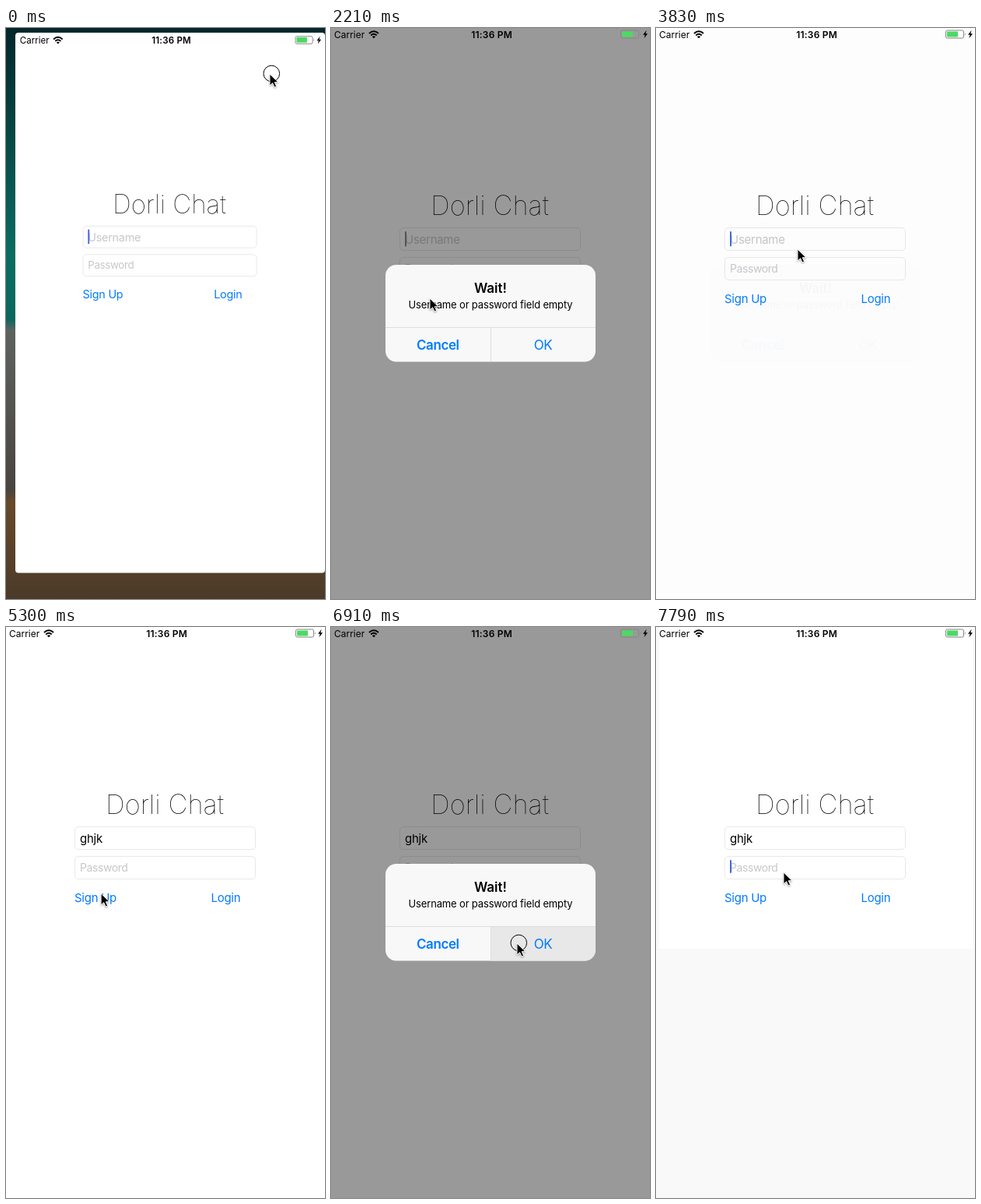
Animation of 410 by 733 pixels, one loop 8 s. Source, as an HTML page:

```html
<!DOCTYPE html>
<html lang="en">
<head>
<meta charset="utf-8">
<title>Chat login</title>
<style>
  html, body { margin: 0; width: 100%; height: 100%; overflow: hidden; background: #fff; }
  svg { display: block; width: 100%; height: 100%; }
  text { font-family: Inter, "Open Sans", sans-serif; white-space: pre; }
  .title { font-size: 34.5px; font-weight: 100; }
  .field { fill: #fff; stroke: #e9e9e9; }
  .hint { fill: #c7c7cc; }
  .body { font-size: 15px; letter-spacing: -.018em; }
  .small { font-size: 14px; letter-spacing: -.03em; }
  .blue { fill: #007aff; }
  .mid { text-anchor: middle; }
  .status { font-size: 12px; }
  .head { font-size: 17px; font-weight: 600; }
  .button { font-size: 17px; letter-spacing: -.025em; }
  .note { font-size: 13px; letter-spacing: -.012em; }
  .bold { font-weight: 600; }
  .arrow { filter: drop-shadow(0 1px 1px rgba(0, 0, 0, .35)); }
</style>
</head>
<body>
<svg viewBox="0 0 410 733" preserveAspectRatio="none">
  <defs>
    <linearGradient id="beach" x1="0" y1="0" x2="0" y2="1">
      <stop offset="0" stop-color="#03262b"/>
      <stop offset=".4" stop-color="#0a6d61"/>
      <stop offset=".51" stop-color="#0b675c"/>
      <stop offset=".53" stop-color="#5d625f"/>
      <stop offset=".81" stop-color="#4a4440"/>
      <stop offset=".83" stop-color="#674a2a"/>
      <stop offset="1" stop-color="#4b3a29"/>
    </linearGradient>
  </defs>
  <rect width="410" height="733" fill="url(#beach)"/>
  <rect id="screen" fill="#fff"/>

  <g id="page">
    <text class="title mid" x="204" y="240">Dorli Chat</text>
    <rect class="field" x="88.5" y="256.5" width="232" height="29" rx="4.5"/>
    <rect class="field" x="88.5" y="294.5" width="232" height="29" rx="4.5"/>
    <text id="user" class="body" x="95" y="276.5"></text>
    <text class="small hint" x="95" y="313.5">Password</text>
    <rect id="caret" width="2" rx="1"/>
    <text id="signup" class="body blue" x="88" y="352.5">Sign Up</text>
    <text class="body blue" x="263.5" y="352.5">Login</text>
  </g>

  <rect id="dim" width="410" height="733"/>
  <path id="edge" d="M0 0H410V733H0ZM4 0V413H407V0Z" fill="#f9f9f9" fill-rule="evenodd"/>

  <g id="status">
    <text class="status" x="4" y="12.7">Carrier</text>
    <g fill="none" stroke="#000" stroke-width="2">
      <path d="M49 7Q55 1.4 61 7"/>
      <path d="M51.3 9.4Q55 6 58.7 9.4"/>
    </g>
    <path d="M55 13.3L52.9 11.2Q55 9.4 57.1 11.2Z"/>
    <text class="status bold mid" x="206.6" y="12.8" letter-spacing=".2">11:36 PM</text>
    <rect x="372.5" y="3" width="23" height="10" rx="2" fill="none" stroke="#858585"/>
    <rect x="374" y="4.5" width="14" height="7" rx=".7" fill="#4cd964"/>
    <path d="M397 6.3Q398.6 8 397 9.7Z" fill="#777"/>
    <path d="M405.6 2.8L401 8.8H403.6L402.4 13.2L407 7.2H404.3Z"/>
  </g>

  <g id="alert">
    <g id="plate">
      <rect x="70" y="304" width="270" height="124.5" rx="14" fill="#f8f8f8"/>
      <path id="pressed" d="M205.5 384.5H340V414.5A14 14 0 0 1 326 428.5H205.5Z" fill="#e8e8e8"/>
      <path d="M70 384.5H340M205.5 384.5V428.5" stroke="#dedee0" fill="none"/>
    </g>
    <g id="words">
      <text class="head mid" x="205" y="340">Wait!</text>
      <text class="note mid" x="205" y="360">Username or password field empty</text>
      <text class="button bold blue mid" x="137.3" y="413">Cancel</text>
      <text class="button blue mid" x="272.5" y="413">OK</text>
    </g>
  </g>

  <g id="mouse">
    <circle id="ring" cx="2.3" cy="-.5" r="10.3" fill="none" stroke="#000"/>
    <path class="arrow" d="M0 0V15L3.6 11.7L6 17L8.6 15.9L6.3 10.7H11Z" stroke="#fff" stroke-linejoin="round"/>
  </g>
</svg>

<script>
const LOOP = 8000, STEP = 147, LAST = 53;
const LOGIN = "ghjk", TYPE_AT = 29, PASSWORD_AT = 52;

// Steps at which each alert is asked for, shown, accepted and dismissed
const rounds = [
  { tap: 11, show: 14, ok: 22, done: 24 },
  { tap: 39, show: 41, ok: 46, done: 47 }
];

const ok = [239, 406];
const home = [339, 59];
const moves = [
  { from: 1, to: 10, place: [127, 347] },
  { from: 17, to: 22, place: ok },
  { from: 24, to: 26, place: [182, 284] },
  { from: 33, to: 38, place: [118, 346] },
  { from: 41, to: 45, place: ok },
  { from: 48, to: PASSWORD_AT, place: [164, 315] }
];

const el = {};
for (const node of document.querySelectorAll("[id]")) el[node.id] = node;

const mix = (a, b, k) => a + (b - a) * k;
const clamp = v => Math.max(0, Math.min(1, v));
const within = (n, a, b) => n >= a && n <= b;
const smooth = k => k * k * (3 - 2 * k);
const easeOut = k => 1 - (1 - k) ** 3;
const set = (node, attrs) => {
  for (const k in attrs) node.setAttribute(k, attrs[k]);
};
const fade = (node, opacity) => set(node, { opacity: Number(opacity) });

const asking = n => rounds.some(r => within(n, r.tap, r.show - 1));
const accepting = n => rounds.some(r => within(n, r.ok, r.ok + 1));

function drawWindow(n) {
  const z = smooth(clamp(n / 5));
  set(el.screen, {
    x: mix(12, 0, z), y: mix(6, 0, z), rx: mix(4, 0, z),
    width: mix(398, 410, z), height: mix(693.5, 733, z)
  });
  const transform = `translate(${mix(14, 0, z)} ${mix(7.8, 0, z)}) scale(${mix(.961, 1, z)})`;
  set(el.page, { transform });
  set(el.status, { transform });
}

function caretOpacity(n, typed) {
  const round = rounds.find(r => within(n, r.show, r.done + 1));
  if (round) return typed ? 0 : 1;
  if (within(n, TYPE_AT, TYPE_AT + LOGIN.length)) return 1;
  const start = n >= PASSWORD_AT ? PASSWORD_AT + 1 : n >= 26 ? 26 : 0;
  return clamp(.5 + Math.cos((n - start + .5) * Math.PI * 2 / 7));
}

function drawForm(n) {
  const typed = LOGIN.slice(0, Math.max(0, n - TYPE_AT + 1));
  el.user.textContent = typed || "Username";
  set(el.user, { class: typed ? "body" : "body hint" });
  fade(el.signup, asking(n) ? .2 : 1);

  const inPassword = n >= PASSWORD_AT;
  const behind = rounds.some(r => within(n, r.show, r.done + 1));
  set(el.caret, {
    x: typed && !inPassword ? 96 + el.user.getComputedTextLength() : 95,
    y: inPassword ? 299 : 261,
    height: inPassword ? 17 : 19.5,
    fill: behind ? "#8a8a8a" : "#4569e0"
  });
  fade(el.caret, caretOpacity(n, typed));
}

function drawAlert(n) {
  const round = rounds.find(r => within(n, r.show, r.done + 2));
  const grow = round ? Math.min(1, .64 + .36 * (n - round.show)) : 0;
  const leave = round ? clamp(1 - Math.max(0, n - round.done) / 2.1) ** 1.3 : 0;
  const size = 1 + .19 * (1 - grow);
  fade(el.dim, .4 * grow * leave);
  fade(el.plate, grow ** .3 * leave);
  fade(el.words, grow ** .8 * leave);
  fade(el.pressed, accepting(n));
  fade(el.edge, n >= rounds[1].done + 2);
  set(el.alert, { transform: `translate(205 366.2) scale(${size}) translate(-205 -366.2)` });
}

function drawMouse(n) {
  let [x, y] = home;
  for (const { from, to, place } of moves) {
    const k = easeOut(clamp((n - from) / (to - from)));
    x = mix(x, place[0], k);
    y = mix(y, place[1], k);
  }
  set(el.mouse, { transform: `translate(${x} ${y})` });
  fade(el.ring, n === 0 || n === PASSWORD_AT || accepting(n) || rounds.some(r => n === r.tap));
}

function draw(ms) {
  const n = Math.min(LAST, Math.floor((ms % LOOP + 8) / STEP));
  drawWindow(n);
  drawForm(n);
  drawAlert(n);
  drawMouse(n);
}

const begin = performance.now();
function loop() {
  draw(performance.now() - begin);
  requestAnimationFrame(loop);
}
loop();
</script>
</body>
</html>
```
